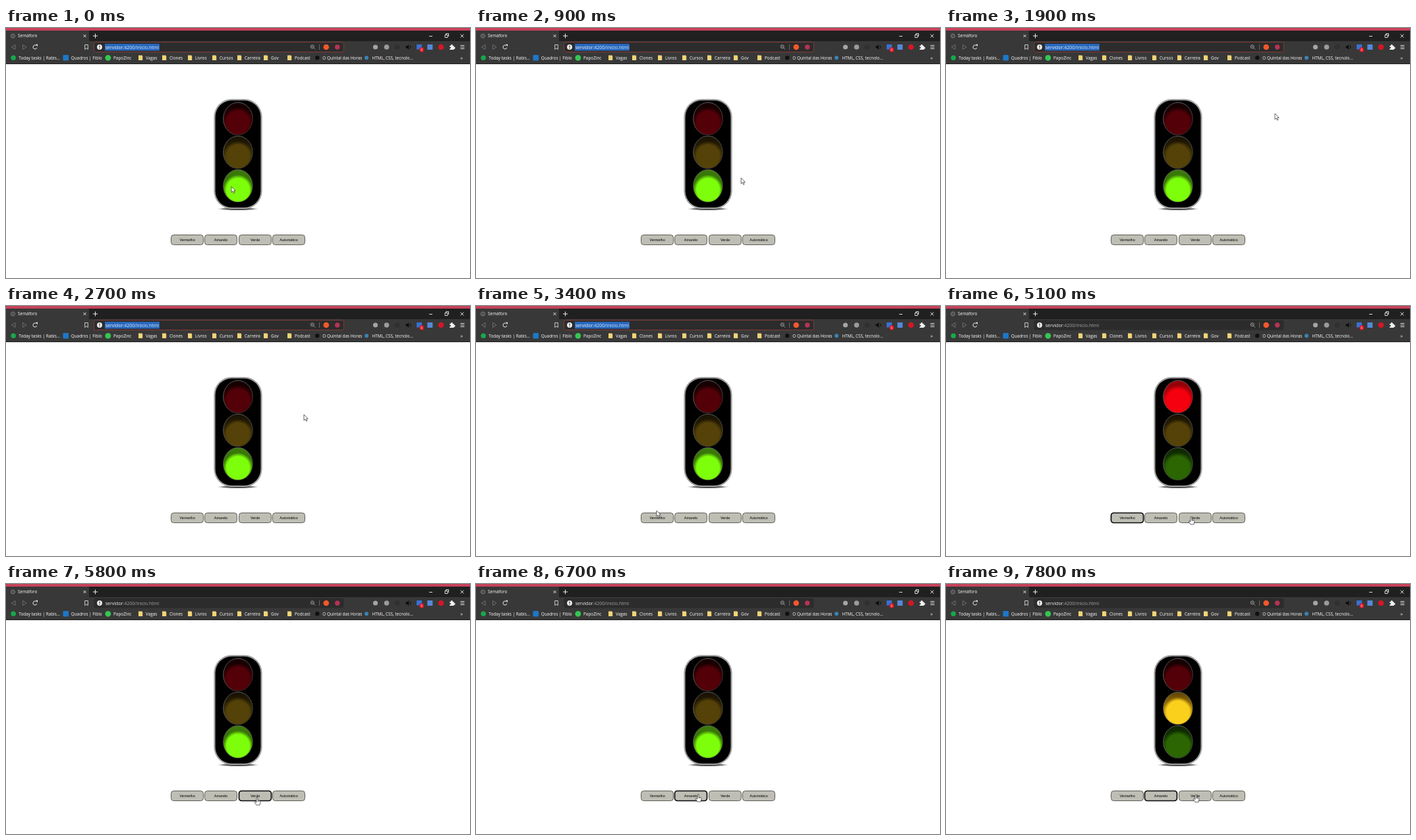
Animation, 704 px wide and 380 px high, one loop 8000 ms. Source, as an HTML page with a canvas:

```html
<!DOCTYPE html>
<html lang="pt">
<head>
<meta charset="utf-8">
<title>Semáforo</title>
<style>
html, body { margin: 0; width: 100%; height: 100%; overflow: hidden; background: #fff; }
canvas { display: block; }
</style>
</head>
<body>
<canvas id="stage" width="704" height="380"></canvas>
<script>
const ctx = document.getElementById('stage').getContext('2d');
const LOOP = 8000, STEP = 100;
const UI = '"Open Sans", sans-serif';
const ARIAL = '"Liberation Sans", Arial, sans-serif';

// time, x, y of the pointer's hot spot
const pointerPath = [
  [0, 342, 241], [200, 342, 241], [800, 402, 228], [1800, 404, 226], [1900, 499, 130],
  [2200, 499, 131], [2500, 483, 147], [2700, 452, 165], [3000, 345, 255], [3300, 275, 311],
  [3400, 274, 311], [3700, 274, 324], [4800, 274, 324], [5100, 372, 320], [5400, 381, 324],
  [6000, 381, 324], [6500, 337, 319], [7300, 337, 319], [7800, 379, 319.5], [8000, 379, 319.5]
];

// each state: colour at the top, behind the bulb, and of the bulb
const lamps = [
  { y: 138, off: ['#120001', '#2a0003', '#540008'], on: ['#8c0008', '#b4000a', '#f4000e'] },
  { y: 189, off: ['#161002', '#302505', '#554208'], on: ['#5c4304', '#a87c08', '#fbd01d'] },
  { y: 240, off: ['#0c2400', '#193f00', '#2b6602'], on: ['#3c7a0c', '#347000', '#7dff0b'] }
];

const buttons = [[250, 'Vermelho'], [301, 'Amarelo'], [353, 'Verde'], [404, 'Automático']];

const folders = [[201, 'Vagas'], [237, 'Clones'], [276, 'Livros'], [313, 'Cursos'],
  [351, 'Carreira'], [391, 'Gov'], [427, 'Podcast']];

function rect(x, y, w, h, color) {
  ctx.fillStyle = color;
  ctx.fillRect(x, y, w, h);
}

function round(x, y, w, h, r, fill, stroke, width = 1) {
  ctx.beginPath();
  ctx.roundRect(x, y, w, h, r);
  if (fill) { ctx.fillStyle = fill; ctx.fill(); }
  if (stroke) { ctx.strokeStyle = stroke; ctx.lineWidth = width; ctx.stroke(); }
}

function dot(x, y, r, color) {
  ctx.beginPath();
  ctx.arc(x, y, r, 0, Math.PI * 2);
  ctx.fillStyle = color;
  ctx.fill();
}

function ring(x, y, r, color, from = 0, to = Math.PI * 2) {
  ctx.beginPath();
  ctx.arc(x, y, r, from, to);
  ctx.strokeStyle = color;
  ctx.lineWidth = 1;
  ctx.stroke();
}

function stroke(path, color, width = 1) {
  ctx.strokeStyle = color;
  ctx.lineWidth = width;
  ctx.stroke(new Path2D(path));
}

function fill(path, color) {
  ctx.fillStyle = color;
  ctx.fill(new Path2D(path));
}

function text(str, x, y, size, color, family = UI, align = 'left') {
  ctx.font = `${size}px ${family}`;
  ctx.textAlign = align;
  ctx.fillStyle = color;
  ctx.fillText(str, x, y);
  return ctx.measureText(str).width;
}

function drawTabs() {
  rect(0, 0, 704, 55, '#383838');
  rect(0, 54, 704, 1, '#242122');
  rect(0, 4, 704, 16, '#202020');
  rect(0, 4, 126, 16, '#383838');
  rect(0, 0, 704, 4, '#c6415a');
  ring(10.5, 12, 3, '#858585');
  stroke('M7.5 12h6M10.5 9v6', '#6c6c6c', .7);
  text('Semáforo', 18, 14.3, 6.5, '#ffffff');
  stroke('M117.5 10l4 4M121.5 10l-4 4', '#e2e2e2');
  stroke('M132 12h7M135.5 8.5v7', '#f0f0f0');
  stroke('M642 12.5h5M666 10.5h4v4h-4zM667.5 10V8.5h4v4H670.5M689.5 9.5l5 5M694.5 9.5l-5 5', '#f0f0f0', .9);
}

function drawToolbar(selected) {
  stroke('M14 25.5v7l-5.5-3.5zM25.5 25.5v7l5.5-3.5z', '#747474', .9);
  ring(44, 29, 3, '#f0f0f0', .3, 5.4);
  fill('M45 24.8h3v3.4z', '#f0f0f0');
  stroke('M119.7 25.5h4.6v7l-2.3-1.8l-2.3 1.8z', '#dedede', .9);

  const field = '#2c2c2c';
  round(133.5, 21.5, 379, 15, 3, field, selected ? '#843a36' : null);
  dot(142, 29, 3.9, '#f0f0f0');
  rect(141.4, 26.5, 1.2, 3, field);
  rect(141.4, 30.4, 1.2, 1.2, field);
  const host = 'servidor', path = ':4200/inicio.html';
  ctx.font = `7px ${UI}`;
  if (selected) rect(150, 24, ctx.measureText(host + path).width + 1.5, 10.5, '#2768bd');
  const w = text(host, 150.7, 31.5, 7, '#f5f5f5');
  text(path, 150.7 + w, 31.5, 7, selected ? '#dce8f8' : '#a5a5a5');

  ring(464.8, 28.3, 2.5, '#a0a0a0');
  stroke('M466.8 30.3l2.3 2.3M463.6 28.3h2.4', '#a0a0a0', .9);
  rect(475, 25, 1, 8, '#686868');
  dot(485.8, 29, 4.3, '#f4572c');
  dot(502.7, 29, 3.7, '#b63355');

  dot(560.5, 29, 3.6, '#a5a5a5');
  dot(577.5, 29, 3.8, '#9b9b9b');
  ring(593.5, 29, 3, '#262626');
  dot(593.5, 29, 1, '#262626');
  fill('M606.5 27.5h2l2.6-2.4v7.8l-2.6-2.4h-2z', '#0a0a0a');
  ring(610.8, 29, 3, '#0a0a0a', -.9, .9);
  rect(623, 25, 8, 7.5, '#3771d1');
  round(627.5, 29.5, 6.5, 7, 2, '#dc1524');
  text('6', 630.8, 35, 5, '#fff', UI, 'center');
  rect(639.3, 25, 8, 8, '#5688d8');
  dot(660, 29, 4.3, '#d31725');
  fill('M673 27h2a1.4 1.4 0 1 1 2.6 0h2v2a1.4 1.4 0 1 1 0 2.6v1.4h-6.6v-1.8a1.3 1.3 0 1 0 0-2.4z', '#f2f2f2');
  stroke('M689.5 26.5h6M689.5 29h6M689.5 31.5h6', '#eeeeee', .9);
}

function drawBookmarks() {
  const label = (str, x) => text(str, x, 47.5, 6.4, '#ffffff');
  dot(11.2, 45.2, 3.8, '#17a84a');
  label('Today tasks | Rabis...', 19.3);
  round(86.5, 41, 8.5, 8.5, 1, '#1c78c8');
  label('Quadros | Fiblo', 98.7);
  dot(154.8, 45.3, 4.4, '#34c653');
  label('PapoZinc', 163);
  for (const [x, name] of folders) {
    fill(`M${x} 41.5h5.2l1 1.2v6.3h-6.2z`, '#f2d477');
    label(name, x + 11);
  }
  dot(472.3, 45.3, 3.2, '#111111');
  label('O Quintal das Horas', 480.3);
  dot(547, 45.2, 3, '#3a83b3');
  label('HTML, CSS, tecnolo...', 555.5);
  text('»', 689.3, 47.7, 8, '#f0f0f0');
}

function drawLamp({ y, on, off }, lit) {
  const [top, back, bulb] = lit ? on : off;
  const x = 352, rx = 22.3, ry = 24.7;
  ctx.save();
  ctx.beginPath();
  ctx.ellipse(x, y, rx, ry, 0, 0, Math.PI * 2);
  ctx.clip();
  const shade = ctx.createLinearGradient(0, y - ry, 0, y);
  shade.addColorStop(0, top);
  shade.addColorStop(1, back);
  rect(x - rx, y - ry, rx * 2, ry * 2, shade);
  const glow = ctx.createRadialGradient(x, y + 6, 15.5, x, y + 5.5, 22.5);
  glow.addColorStop(0, bulb);
  glow.addColorStop(.25, bulb);
  glow.addColorStop(1, bulb + '00');
  rect(x - rx, y - ry, rx * 2, ry * 2, glow);
  ctx.restore();

  const rim = ctx.createLinearGradient(x - rx, y - ry, x + rx, y + ry);
  rim.addColorStop(0, '#555555');
  rim.addColorStop(.3, '#777777');
  rim.addColorStop(.65, '#555555');
  rim.addColorStop(1, '#181818');
  ctx.beginPath();
  ctx.ellipse(x, y, rx, ry, 0, 0, Math.PI * 2);
  ctx.strokeStyle = rim;
  ctx.lineWidth = .8;
  ctx.stroke();
}

function drawTrafficLight(active) {
  ctx.save();
  ctx.translate(352, 275);
  ctx.scale(1, .075);
  const shade = ctx.createRadialGradient(0, 0, 6, 0, 0, 34);
  shade.addColorStop(0, '#333333');
  shade.addColorStop(.6, '#777777');
  shade.addColorStop(1, '#ffffff00');
  dot(0, 0, 34, shade);
  ctx.restore();

  round(315.5, 108, 73, 167, 27, '#8c8c8c');
  round(316.5, 109, 71, 165, 26, '#b8b8b8');
  round(317.5, 110, 69, 163, 25, '#000000');
  lamps.forEach((lamp, i) => drawLamp(lamp, i === active));
}

function drawButtons(focused) {
  buttons.forEach(([x, name], i) => {
    const focus = i === focused;
    round(x + .5, 314.5, 49, 15, 4, '#bebeb4', focus ? '#080808' : '#5c5c57', focus ? 1.7 : 1);
    text(name, x + 25.1, 323.8, 5.5, '#000000', ARIAL, 'center');
  });
}

function pointerAt(t) {
  const i = pointerPath.findIndex(key => key[0] > t);
  const [t0, x0, y0] = pointerPath[i - 1], [t1, x1, y1] = pointerPath[i];
  const k = (t - t0) / (t1 - t0);
  return [x0 + (x1 - x0) * k, y0 + (y1 - y0) * k];
}

function drawPointer(t) {
  const [x, y] = pointerAt(t);
  const hand = y > 314;
  const shape = hand
    ? 'M-1 1Q0 -.6 1 1V5L4.2 5.8Q5.2 6.2 5 7.5L4 12H-1L-3.6 8.1Q-4 6.6-2.7 6.8L-1 8.1Z'
    : 'M0 0V8.8L2 7L3.5 10.2L5 9.5L3.6 6.4H6.2Z';
  ctx.save();
  ctx.translate(x, y);
  ctx.lineJoin = 'round';
  fill(shape, '#ffffff');
  stroke(shape, '#333333', .75);
  if (hand) stroke('M1 5v2M2.6 5.6v1.8', '#333333', .5);
  ctx.restore();
}

function draw(t) {
  const active = t < 4200 ? 2 : t < 5600 ? 0 : t < 6800 ? 2 : 1;
  const focused = t < 4100 ? -1 : t < 5500 ? 0 : t < 6700 ? 2 : 1;
  rect(0, 0, 704, 380, '#ffffff');
  drawTabs();
  drawToolbar(t < 4000);
  drawBookmarks();
  drawTrafficLight(active);
  drawButtons(focused);
  drawPointer(t);
}

const start = performance.now();
function tick() {
  const t = (performance.now() - start) % LOOP;
  draw(Math.floor(t / STEP) * STEP);
  requestAnimationFrame(tick);
}
tick();
</script>
</body>
</html>
```
